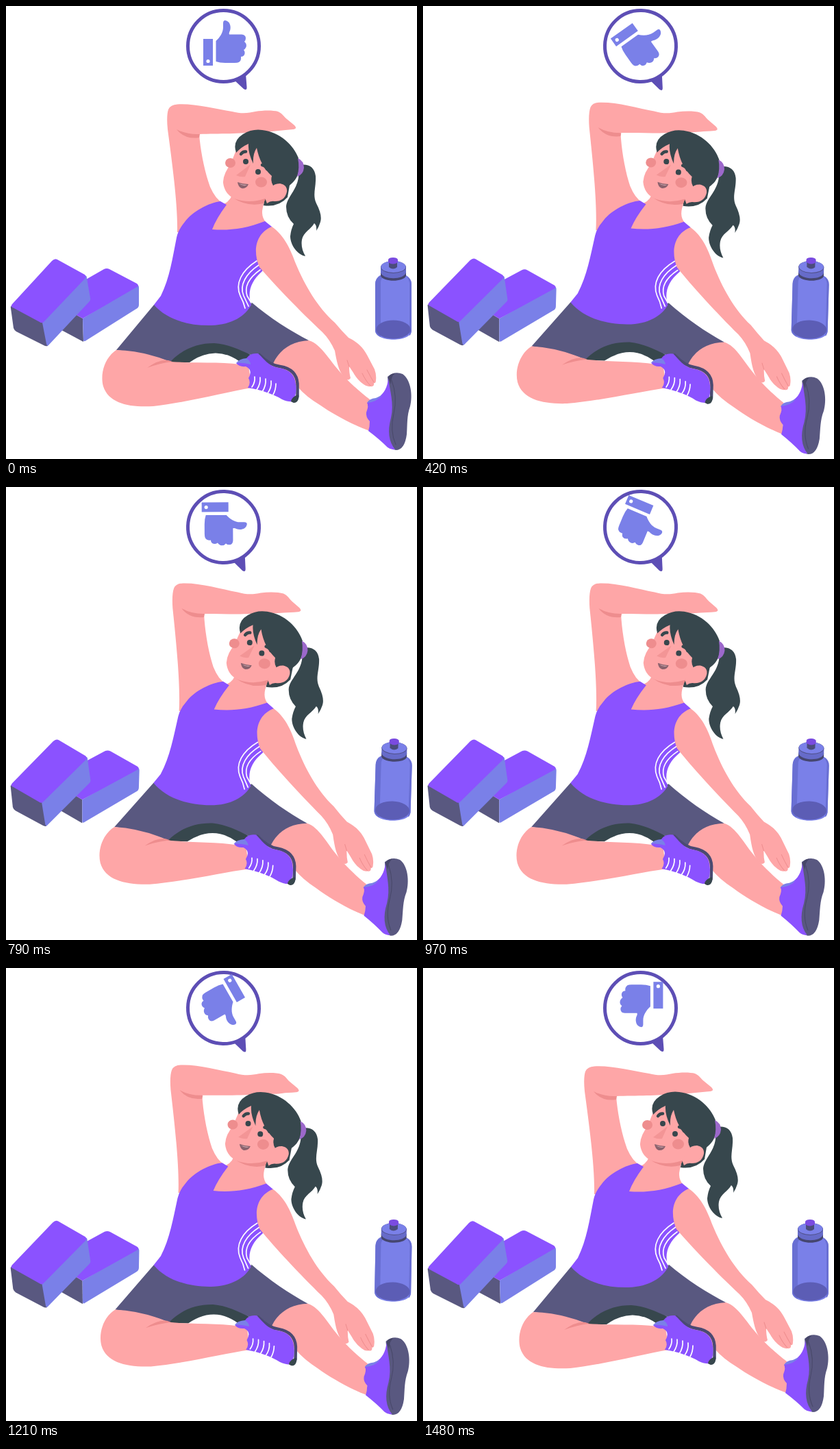
These frames come from a looping animation (600x661 px, 1510 ms). An HTML page:

```html
<!DOCTYPE html>
<html lang="en">
<head>
<meta charset="utf-8">
<title>Stretching</title>
<style>
  html, body { margin: 0; width: 100%; height: 100%; overflow: hidden; background: #fff; }
  svg { display: block; width: 100vw; height: 100vh; }
  .skin { fill: #fea6a7; }
  .blush { fill: #ee8d8e; }
  .hair { fill: #37474d; }
  .violet { fill: #8b52ff; }
  .indigo { fill: #7a80e8; }
  .slate { fill: #595880; }
  .line { fill: none; stroke-linecap: round; stroke-linejoin: round; }
  .white { stroke: #fff; stroke-width: 1.7; }
</style>
</head>
<body>
<svg viewBox="0 0 600 661" xmlns="http://www.w3.org/2000/svg">
  <g id="blocks">
    <path class="slate" d="M70 432L112 456L113 490L70 467Z"/>
    <path class="indigo" d="M112 456L190 408Q194 406 194 411V436Q194 440 190 442L117 488Q113 491 113 487Z"/>
    <path class="violet" d="M80 420L143 384Q147 382 151 384L191 405Q195 408 191 410L112 456L80 438Z"/>
    <path class="slate" d="M7 441Q6 437 10 438L54 460L61 496Q58 497 55 495L15 475Q12 473 11 470Z"/>
    <path class="indigo" d="M53 462L114 394Q118 392 118 397L123 426Q124 429 121 432L62 495Q60 497 59 493Z"/>
    <path class="violet" d="M8 439Q7 437 9 435L67 372Q71 368 75 370L115 392Q118 395 115 398L56 460Q53 464 49 461Z"/>
  </g>

  <g id="bottle">
    <path class="indigo" d="M546 393Q539 397 539 406V474C540 491 591 491 592 474V406Q592 397 584 393Z"/>
    <path fill="#696fd3" d="M546 394Q539 398 539 406V474Q540 480 547 483V404Q547 398 551 395Z"/>
    <path fill="#696fd3" d="M584 394Q592 398 592 406V474Q591 480 589 481V404Q588 398 584 394Z"/>
    <ellipse cx="565.5" cy="472" rx="25" ry="13.5" fill="#5c5db5"/>
    <path fill="#45466f" d="M547 388V394C551 403 580 403 584 394V388Z"/>
    <path fill="#666bc9" d="M547 380V389C550 400 581 400 584 389V380Z"/>
    <ellipse cx="565.5" cy="381" rx="18.5" ry="9" fill="#50518a"/>
    <ellipse cx="565.5" cy="380.5" rx="18" ry="8.500" class="indigo"/>
    <path fill="#4b4c7c" d="M559 373V381Q565 386 571 381V373Z"/>
    <path fill="#7a4be0" d="M558 370Q559 367 565 367Q571 367 572 370V374Q565 379 558 374Z"/>
  </g>

  <g id="woman">
    <!-- extended leg and shoe -->
    <path class="skin" d="M387 524C395 500 415 486 442 488C456 492 466 507 480 525C496 545 515 562 531 574L531 620C508 612 478 596 458 582Q438 570 426 556Q408 535 387 524Z"/>
    <path class="slate" d="M557 541Q567 532 579 537C591 545 594 568 590 584C585 598 586 610 585 625Q582 648 569 648Q556 645 555 632L562 590Z"/>
    <path fill="#464668" d="M558 543Q560 536 568 536Q562 540 562 552Z"/>
    <path class="violet" d="M527 579Q530 583 526 593Q525 600 531 606Q531 614 529 620Q545 632 557 644Q562 648 568 647Q554 630 562 601C567 580 560 560 558 543C557 556 552 566 543 571Z"/>
    <path class="indigo" d="M527 579Q530 573 540 572L549 568Q541 578 527 579Z"/>
    <path class="line" stroke="#484868" stroke-width="1" d="M563 546Q572 570 566 595T569 640"/>

    <!-- shorts -->
    <path class="hair" d="M238 520C258 497 285 488 310 491C338 494 354 505 364 516L340 518Q305 494 268 520Z"/>
    <path class="slate" d="M216 436L161 502Q202 506 240 519C258 500 280 492 304 492C332 494 355 509 389 524C397 504 415 489 442 488C415 474 385 455 358 432L290 425Z"/>

    <!-- folded leg and shoe -->
    <path class="skin" d="M161 502C144 513 137 537 142 555C150 580 180 586 215 584C262 579 318 564 359 557L354 525C320 518 280 522 240 519Q200 503 161 502Z"/>
    <path class="blush" d="M206 528Q224 515 237 517L243 519Q225 521 206 528Z"/>
    <path class="line" stroke="#4a4a72" stroke-width="4.500" d="M370 509C379 518 388 525 400 526Q424 530 425.500 551V570Q424 577 419 576"/>
    <path class="violet" d="M336 521Q345 519 351 514Q356 506 368 507C375 513 383 526 398 528Q421 531 423 552Q425 566 419 577Q412 578 403 574C390 566 372 560 353 557Q358 550 354 543Q361 531 350 526Q340 527 336 521Z"/>
    <path class="indigo" d="M336 521Q340 515 351 514Q357 518 357 523Q344 520 336 521Z"/>
    <path class="hair" d="M416 577Q417 570 427 567Q428 579 420 579Z"/>
    <path class="line white" d="M363 541Q364 549 359 556M371 542Q372 551 366 560M379 544Q380 554 374 563M387 547Q388 557 382 565M394 551Q394 560 390 567"/>

    <!-- raised arm -->
    <path class="skin" d="M250 330C251 290 242 225 236 180Q234 160 237 151Q240 144 250 143.500C275 142 305 150 330 154C345 158 355 156 364 154C376 152 390 152 397 154C404 157 405 161 410 165L421 174Q426 179 419 180C411 181 405 181 398 182C384 184 374 183 365 183C345 187 310 186 282 187C284 212 290 242 298 264Q306 282 316 287L300 335Z"/>
    <path class="blush" d="M249 180Q264 188 283 187L282 192Q261 195 249 180Z"/>

    <!-- ponytail, back hair, neck -->
    <path class="hair" d="M429 232Q449 229 452 248C453 265 447 275 453 288Q462 305 459 315Q457 322 453 328Q454 320 450 317C445 326 434 330 432 341Q430 353 437 365C425 363 415 348 415 336Q416 326 420 318Q409 308 409 293C410 279 424 270 427 250Z"/>
    <path class="hair" d="M376 291Q398 294 411 279L416 250L380 255Z"/>
    <path class="skin" d="M331 270Q330 283 318 289L299 324L302 329Q345 328 382 318Q370 308 376 290L380 270Z"/>
    <path class="blush" d="M330 279Q350 285 380 279L376 288Q352 294 330 279Z"/>

    <!-- top -->
    <path class="violet" d="M322 290L313 285C296 287 272 300 261 315Q251 327 249 338C243 368 239 397 226 423L216 436C235 458 268 467 300 466C330 465 350 452 358 436C352 418 357 402 374 387L400 350L388 322L378 314C350 325 325 328 301 326Q307 310 322 290Z"/>
    <path class="line white" d="M366 372C344 386 334 405 342 423Q347 432 349 441M369 378C351 390 340 407 347 423L354 438M371 385C357 395 347 408 352 423L358 433"/>

    <!-- lower arm -->
    <path class="skin" d="M388 322C407 335 416 357 423 376C436 407 455 440 480 462Q490 474 500 484C514 491 522 499 528 511L538 530Q541 538 540 546Q540 551 537 550Q538 556 532 555Q527 556 522 552Q513 546 507 535L501 526Q501 536 503 543Q499 548 495 543C486 535 483 520 480 503Q473 487 462 476C430 446 392 407 370 381C360 358 364 332 388 322Z"/>
    <path class="line" stroke="#ee8d8e" stroke-width="1" d="M520 536Q525 547 532 554M527 531Q532 541 537 549M501 526L498 517"/>

    <!-- head -->
    <path class="skin" d="M346 194Q333 213 329 230Q317 244 317 258Q319 274 333 281Q355 289 378 281L396 262L394 220L370 192Z"/>
    <ellipse class="blush" cx="327.500" cy="229" rx="7.500" ry="7"/>
    <path fill="#f39596" d="M357 231L336 247Q342 250 349 249Z"/>
    <ellipse class="blush" cx="372.500" cy="257" rx="8.500" ry="7.500"/>
    <circle class="hair" cx="350" cy="227" r="4"/>
    <circle class="hair" cx="368" cy="242" r="4"/>
    <path class="line" stroke="#37474d" stroke-width="4.500" d="M343 216Q346 212 350 212.500M374 232Q379 233 381 238"/>
    <path fill="#8a626d" d="M338 257Q346 260 354 260Q351 267 344 266Q339 264 338 257Z"/>
    <path fill="#c9a3aa" d="M340 259Q346 261 352 261Q347 264 340 259Z"/>
    <path class="hair" d="M336 214Q330 197 346 187Q359 179 374 181C400 184 420 203 427 222C430 238 427 251 416 260L410 265L390 262Q386 256 388 248Q371 233 366 207Q360 216 361 230Q353 214 354 201Q343 206 336 214Z"/>
    <path class="skin" d="M387 265Q391 259 400 259Q411 261 410 271Q407 285 392 285Q386 284 381 288L378 280Z"/>
    <path fill="#9c68cb" d="M426 222Q435 226 435 236Q434 246 425 249Q429 236 426 222Z"/>
  </g>

  <g id="bubble">
    <path fill="#5d4eb5" d="M333 108L347 121Q352 124 351.500 118L350 99Z"/>
    <circle cx="317.500" cy="58.500" r="52" fill="#fff" stroke="#5d4eb5" stroke-width="5"/>
  </g>
  <g id="thumb" class="indigo">
    <path d="M288 48H302V87H288Z"/>
    <circle cx="295" cy="80.500" r="2.600" fill="#fff"/>
    <path d="M306.500 51C312 46 317 39 317 31V25Q317 21 320 21C327 22 329 30 327 36Q325 40 326 41.500H344Q350 42 350 47Q350 50 348 52Q352 55 350.500 60Q349 63 347 64Q350 68 347.500 72Q346 74 343 74Q344 79 340 82Q338 83 334 83H320Q312 83 306.500 81Z"/>
  </g>
</svg>
<script>
  const LOOP = 1510, TILT = 1.78;
  const sways = [["woman", 352, 413], ["blocks", 100, 434], ["bottle", 566, 427], ["bubble", 317.5, 58.5]];
  // time in ms, thumb angle in degrees
  const turns = [[0, 0], [210, 20.5], [420, 54.5], [550, 62], [640, 72], [970, 112.5], [1210, 150], [1480, 180], [1510, 180]];

  const byId = id => document.getElementById(id);
  const ease = x => (1 - Math.cos(Math.PI * Math.min(1, Math.max(0, x)))) / 2;
  const rise = i => (turns[i + 1][1] - turns[i][1]) / (turns[i + 1][0] - turns[i][0]);

  function slope(i) {
    if (i === 0 || i === turns.length - 1) return 0;
    const a = rise(i - 1), b = rise(i);
    return a + b ? 2 * a * b / (a + b) : 0;
  }

  // monotone cubic through the turn keys
  function thumbAngle(t) {
    let i = 0;
    while (i < turns.length - 2 && t >= turns[i + 1][0]) i++;
    const [t0, a] = turns[i], [t1, b] = turns[i + 1];
    const h = t1 - t0, u = (t - t0) / h, v = 1 - u;
    return a * v * v * (1 + 2 * u) + b * u * u * (3 - 2 * u)
      + h * u * v * (slope(i) * v - slope(i + 1) * u);
  }

  function rotate(id, angle, x, y) {
    byId(id).setAttribute("transform", `rotate(${angle.toFixed(3)} ${x} ${y})`);
  }

  function draw(t) {
    const lean = TILT * (t < 750 ? ease(t / 520) : ease((1490 - t) / 490));
    for (const [id, x, y] of sways) rotate(id, lean, x, y);
    rotate("thumb", thumbAngle(t), 319.2, 53.6);
  }

  const start = performance.now();
  function tick() {
    draw((performance.now() - start) % LOOP);
    requestAnimationFrame(tick);
  }
  draw(0);
  requestAnimationFrame(tick);
</script>
</body>
</html>
```
